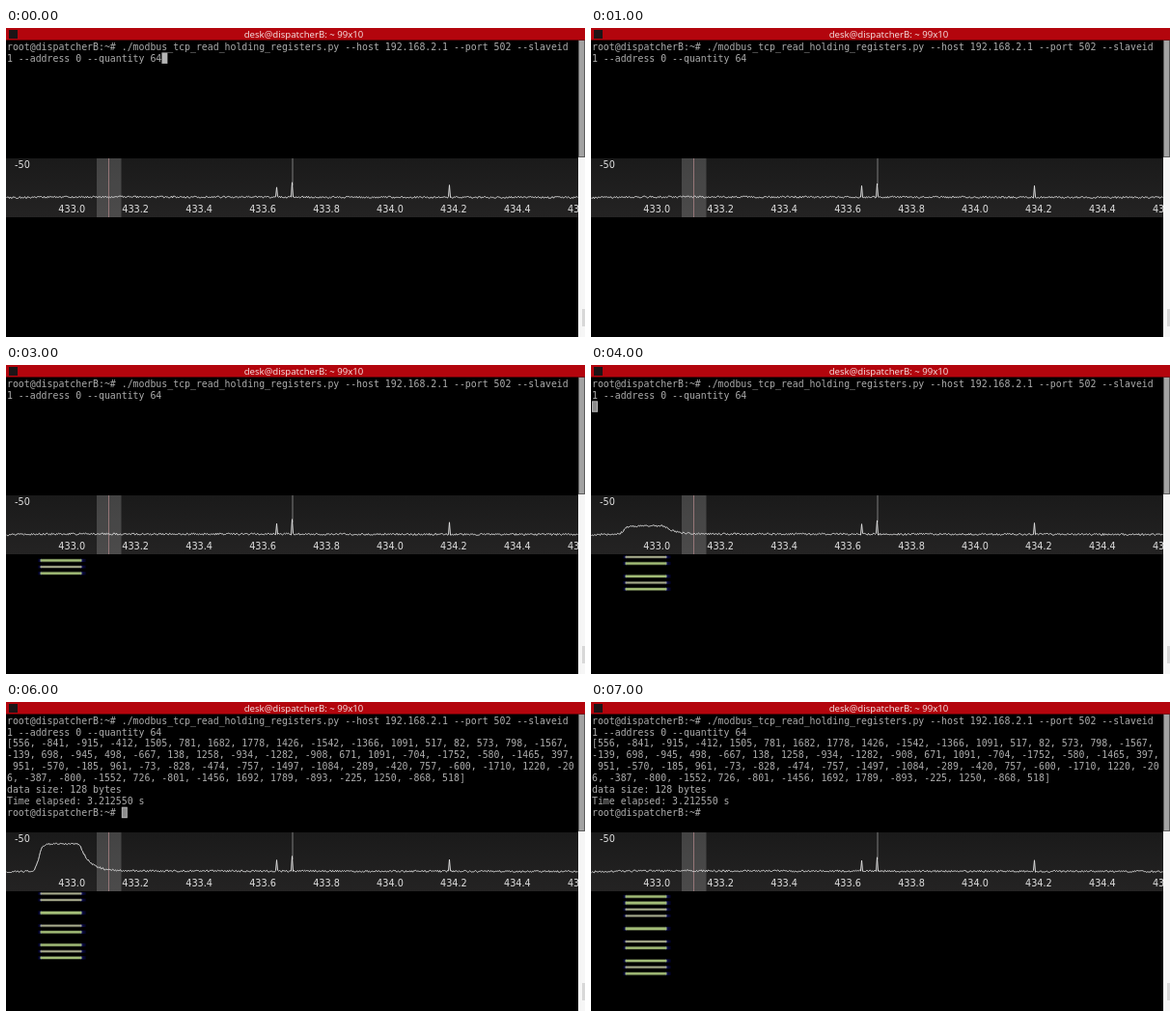
An HTML page with a canvas for the animation above (8 s loop, 600x320 px).

```html
<!DOCTYPE html>
<html lang="en">
<head>
<meta charset="utf-8">
<title>Modbus over radio</title>
<style>
html, body { margin: 0; width: 100%; height: 100%; overflow: hidden; background: #000; }
canvas { display: block; }
</style>
</head>
<body>
<canvas id="stage" width="600" height="320"></canvas>
<script>
const ctx = document.getElementById('stage').getContext('2d');
const LOOP = 8000, STEP = 1000, BLINK = 1200;
const COLS = 99, CHAR_W = 5.94, ROW_H = 11.9, TERM_X = 1, TERM_Y = 13;
const VIEW_W = 593, PANEL_TOP = 135, PANEL_H = 61, PANEL_BOTTOM = PANEL_TOP + PANEL_H;
const SCROLL = 16.4, SLOT = 6.65; // waterfall pixels per step and per burst slot
const BURSTS = '2120210301132';   // burst strength per slot, oldest first

const PROMPT = 'root@dispatcherB:~# ';
const command = wrap(PROMPT + './modbus_tcp_read_holding_registers.py --host 192.168.2.1 ' +
  '--port 502 --slaveid 1 --address 0 --quantity 64');
const reply = [
  ...wrap('[556, -841, -915, -412, 1505, 781, 1682, 1778, 1426, -1542, -1366, 1091, 517, 82, 573, 798, -1567, ' +
    '-139, 698, -945, 498, -667, 138, 1258, -934, -1282, -908, 671, 1091, -704, -1752, -580, -1465, 397, ' +
    '951, -570, -185, 961, -73, -828, -474, -757, -1497, -1084, -289, -420, 757, -600, -1710, 1220, ' +
    '-206, -387, -800, -1552, 726, -801, -1456, 1692, 1789, -893, -225, 1250, -868, 518]'),
  'data size: 128 bytes', 'Time elapsed: 3.212550 s', PROMPT
];

function wrap(text) {
  const rows = [];
  for (let i = 0; i < text.length; i += COLS) rows.push(text.slice(i, i + COLS));
  return rows;
}

function random(seed) {
  return () => {
    seed = (seed * 1664525 + 1013904223) >>> 0;
    return seed / 4294967296;
  };
}

function rect(color, x, y, w, h) {
  ctx.fillStyle = color;
  ctx.fillRect(x, y, w, h);
}

function label(text, x, y, font, color, align = 'left') {
  ctx.font = font;
  ctx.fillStyle = color;
  ctx.textAlign = align;
  ctx.fillText(text, x, y);
}

function gradient(x0, y0, x1, y1, ...colors) {
  const fill = ctx.createLinearGradient(x0, y0, x1, y1);
  colors.forEach((color, i) => fill.addColorStop(i / (colors.length - 1), color));
  return fill;
}

function drawTitle() {
  rect('#b3050d', 0, 0, 600, 12.5);
  rect('#1c1416', 3, 2, 9, 9);
  label('desk@dispatcherB: ~ 99x10', 308.5, 9.7, '9.6px "Noto Sans", sans-serif', '#f3dcdc', 'center');
}

function drawTerminal(step) {
  const output = step < 2 ? [] : step < 6 ? [''] : reply;
  const rows = [...command, ...output];
  rows.forEach((row, i) =>
    label(row, TERM_X, TERM_Y + 9.6 + i * ROW_H, '9.87px "DejaVu Sans Mono", monospace', '#acacac'));
  if (step * STEP % BLINK >= BLINK / 2) return;
  const x = TERM_X + rows.at(-1).length * CHAR_W;
  const y = TERM_Y + (rows.length - 1) * ROW_H;
  rect('#b4b4b4', x, y + 0.5, 6, 11.5);
  if (step) rect('#8c8c8c', x + 1, y + 1.5, 4, 9.5);
}

function traceHeight(x, step) {
  // Every second step catches a transmission, each stronger than the last.
  const hump = step % 2 ? 0 : 28 * (step / 6) ** 3;
  const rise = 1 / (1 + Math.exp((34 - x) / 1.8));
  const fall = Math.exp(Math.min(0, 76 - x) / 10);
  const peak = (center, height) => height * Math.max(0, 1 - Math.abs(x - center));
  return hump * rise * fall + peak(280.5, 11) + peak(296.5, 15) + peak(459.5, 12);
}

function drawSpectrum(step) {
  rect(gradient(0, PANEL_TOP, 0, PANEL_BOTTOM, '#1a1a1a', '#242323'), 0, PANEL_TOP, VIEW_W, PANEL_H);

  const font = '9.7px "DejaVu Sans", sans-serif';
  for (let i = 0; i < 9; i++)
    label((433 + i * 0.2).toFixed(1), 68.2 + i * 65.95, 190.5, font, '#e0e0e0', 'center');
  label('-50', 9, 145, font, '#e0e0e0');

  rect('rgba(255,255,255,.18)', 94, PANEL_TOP, 25.5, PANEL_H);
  rect('#957678', 106, PANEL_TOP, 1, PANEL_H);
  rect('#7c7c7c', 296.5, PANEL_TOP, 1, 28);

  const noise = random(step * 977 + 31);
  ctx.beginPath();
  for (let x = 0.5; x < VIEW_W; x++) {
    const floor = 174.8 + 1.2 * Math.exp(-x / 25) + 0.7 * x / VIEW_W;
    ctx.lineTo(x, floor - traceHeight(x, step) + (noise() - 0.5) * 1.9);
  }
  ctx.strokeStyle = '#dcdcdc';
  ctx.stroke();
}

function drawBurst(y, strength) {
  const height = 1.3 + strength * 0.5;
  const core = strength > 1 ? '#a3bd78' : '#a9ad8e';
  const left = 33, right = 83;
  ctx.globalAlpha = 0.6;
  rect(gradient(left, 0, left + 4, 0, '#000020', '#2020b0'), left, y - height / 2 - 0.5, 4, height + 1);
  rect(gradient(right - 6, 0, right, 0, '#2020b0', '#000020'), right - 6, y - height / 2 - 0.5, 6, height + 1);
  ctx.globalAlpha = 0.25;
  rect(core, 36, y - height / 2 - 0.8, 42, height + 1.6);
  ctx.globalAlpha = 1;
  rect(core, 35.5, y - height / 2, 43, height);
}

function drawWaterfall(step) {
  [...BURSTS].forEach((strength, slot) => {
    const y = 281.3 - slot * SLOT - SCROLL * (7 - step);
    if (+strength && y > PANEL_BOTTOM + 1) drawBurst(y, +strength);
  });
}

function drawScrollbars() {
  rect('#f6f6f6', VIEW_W, 134, 7, 186);
  rect('#5c5c5c', VIEW_W, 12.5, 7, 121.5);
  rect('#a2a2a2', VIEW_W + 1, 13, 5, 120);
  rect('#d8d8d8', 597, 291, 3, 18);
}

function draw(now) {
  const step = Math.floor(now % LOOP / STEP);
  rect('#000', 0, 0, 600, 320);
  drawTerminal(step);
  drawSpectrum(step);
  drawWaterfall(step);
  drawScrollbars();
  drawTitle();
  requestAnimationFrame(draw);
}
requestAnimationFrame(draw);
</script>
</body>
</html>
```
